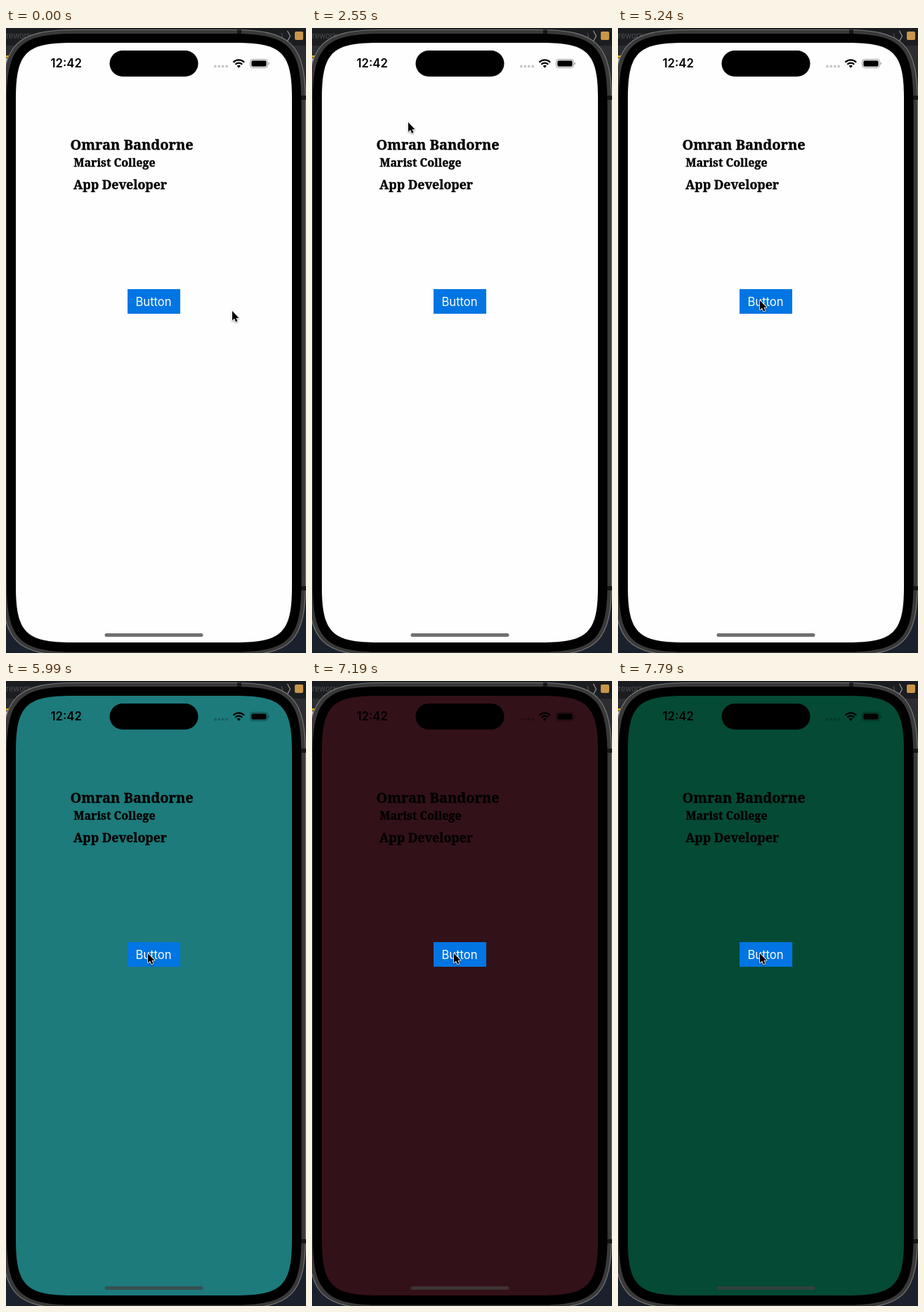
An HTML page for the animation above (8000 ms loop, 427x888 px).

```html
<!DOCTYPE html>
<html lang="en">
<head>
<meta charset="utf-8">
<title>Profile screen</title>
<style>
html, body { margin: 0; width: 100%; height: 100%; overflow: hidden; background: #191b20; }
svg { display: block; width: 100%; height: 100%; }
.ui { font-family: Inter, sans-serif; }
.slab { font-family: "Noto Serif", serif; font-weight: 700; stroke: #000; stroke-width: .4px; }
#cursor { filter: drop-shadow(0 1px 1px #0006); }
</style>
</head>
<body>
<svg viewBox="0 0 427 888">
  <!-- window behind the phone -->
  <rect width="427" height="888" fill="#1b1d21"/>
  <rect y="25" width="427" height="72" fill="#2c2d30"/>
  <rect y="798" width="427" height="90" fill="#1b212c"/>
  <text class="ui" x="0" y="15" font-size="11" fill="#4c4d50">rework</text>
  <path d="M0 40.5h6" stroke="#e0a300" stroke-width="3"/>
  <path d="M0 43h3v8h-3z" fill="#bbb"/>
  <text class="ui" x="391" y="15" font-size="11" fill="#55565a">)</text>
  <path d="M400.5 4l4 7.500-4 7.500" fill="none" stroke="#999" stroke-width="1.200"/>
  <rect x="411" y="5" width="12" height="12" rx="2" fill="#c9964a"/>

  <!-- phone -->
  <path id="ring" fill="#393939" stroke="#777" stroke-width="1.200"/>
  <path d="M329 2.500h6v6h-6zM420 96h7v6h-7zM420 793h7v6h-7z" fill="#161616"/>
  <path id="bezel"/>
  <path id="screen"/>
  <rect x="147.5" y="32" width="126" height="37" rx="18.5"/>

  <!-- status bar -->
  <text class="ui" x="63.500" y="56.300" font-size="16.700" font-weight="600">12:42</text>
  <path d="M297.9 54.500h16.300" stroke="#000" stroke-opacity=".22" stroke-width="3.800"
    stroke-linecap="round" stroke-dasharray="0 5.400"/>
  <path d="M323.5 48.700a11 11 0 0 1 15.600 0M326.4 51.700a7 7 0 0 1 9.800 0"
    fill="none" stroke="#000" stroke-width="2.300"/>
  <path d="M331.3 56.800l-2.600-2.700a3.700 3.700 0 0 1 5.200 0z"/>
  <rect x="347.5" y="44.500" width="25" height="12" rx="3.800" fill="none" stroke="#000" stroke-opacity=".4"/>
  <rect x="349.3" y="46.200" width="21.400" height="8.600" rx="2.300"/>
  <path d="M373.7 48.500a2.300 2.300 0 0 1 0 4z" fill-opacity=".45"/>

  <g class="slab">
    <text x="91.5" y="173" font-size="20">Omran Bandorne</text>
    <text x="96.3" y="197" font-size="16">Marist College</text>
    <text x="96" y="229.300" font-size="17.700">App Developer</text>
  </g>
  <rect x="173" y="371" width="75" height="35" fill="#0075e3"/>
  <text class="ui" x="184.5" y="395" font-size="16.600" fill="#fff">Button</text>
  <rect x="140.5" y="860" width="140" height="5" rx="2.500" fill="#404040" fill-opacity=".74"/>

  <path id="cursor" d="M0 0V13.500L3 10.800 5.200 15.500 7.500 14.500 5.500 9.900H9.500Z"
    stroke="#fff" stroke-width="1.600" paint-order="stroke" stroke-linejoin="round"/>
</svg>
<script>
const $ = id => document.getElementById(id);

// Rectangle with soft corners, one cubic each
function softRect(id, x, y, w, h, r) {
  const far = 1.45 * r, near = .26 * r;
  const dx = w - 2 * far, dy = h - 2 * far;
  const turn = (a, b) => {
    const c = far - near;
    return a[0] ? `c${a[0] * c} 0 ${a[0] * far} ${b[1] * near} ${a[0] * far} ${b[1] * far}`
                : `c0 ${a[1] * c} ${b[0] * near} ${a[1] * far} ${b[0] * far} ${a[1] * far}`;
  };
  const right = [1, 0], down = [0, 1], left = [-1, 0], up = [0, -1];
  $(id).setAttribute("d", `M${x + far} ${y}h${dx}${turn(right, down)}v${dy}${turn(down, left)}` +
    `h${-dx}${turn(left, up)}v${-dy}${turn(up, right)}z`);
}
softRect("ring", -5.5, 2.5, 432, 889, 74);
softRect("bezel", 1, 8, 419.5, 878.5, 68);
softRect("screen", 14, 21, 393, 852, 55);

// Pointer stops: time, x, y
const stops = [
  [150, 322, 402], [900, 302, 395], [1350, 301, 392], [1800, 297, 391],
  [2550, 137, 134], [2850, 176, 165], [3300, 120, 185], [3750, 132, 202],
  [4040, 142, 244], [5240, 202, 387]
];
const colors = [
  [0, "#fefefe"], [5990, "#1d7b7c"], [7040, "#28464a"],
  [7190, "#331118"], [7640, "#1b2e28"], [7790, "#044a35"]
];
const ease = k => k * k * (3 - 2 * k);

function pointer(t) {
  const i = stops.findLastIndex(s => s[0] <= t);
  const [t0, x0, y0] = stops[Math.max(i, 0)];
  const [t1, x1, y1] = stops[Math.min(i + 1, stops.length - 1)];
  const k = t1 > t0 ? ease((t - t0) / (t1 - t0)) : 0;
  return [x0 + (x1 - x0) * k, y0 + (y1 - y0) * k];
}

function draw(now) {
  const t = now % 8000;
  // The picture refreshes every 150 ms, restarting its beat once
  const start = t < 4040 ? 0 : 4040;
  const beat = t - (t - start) % 150;
  $("cursor").setAttribute("transform", `translate(${pointer(beat)})`);
  $("screen").setAttribute("fill", colors.findLast(c => c[0] <= t)[1]);
  requestAnimationFrame(draw);
}
draw(performance.now());
</script>
</body>
</html>
```
